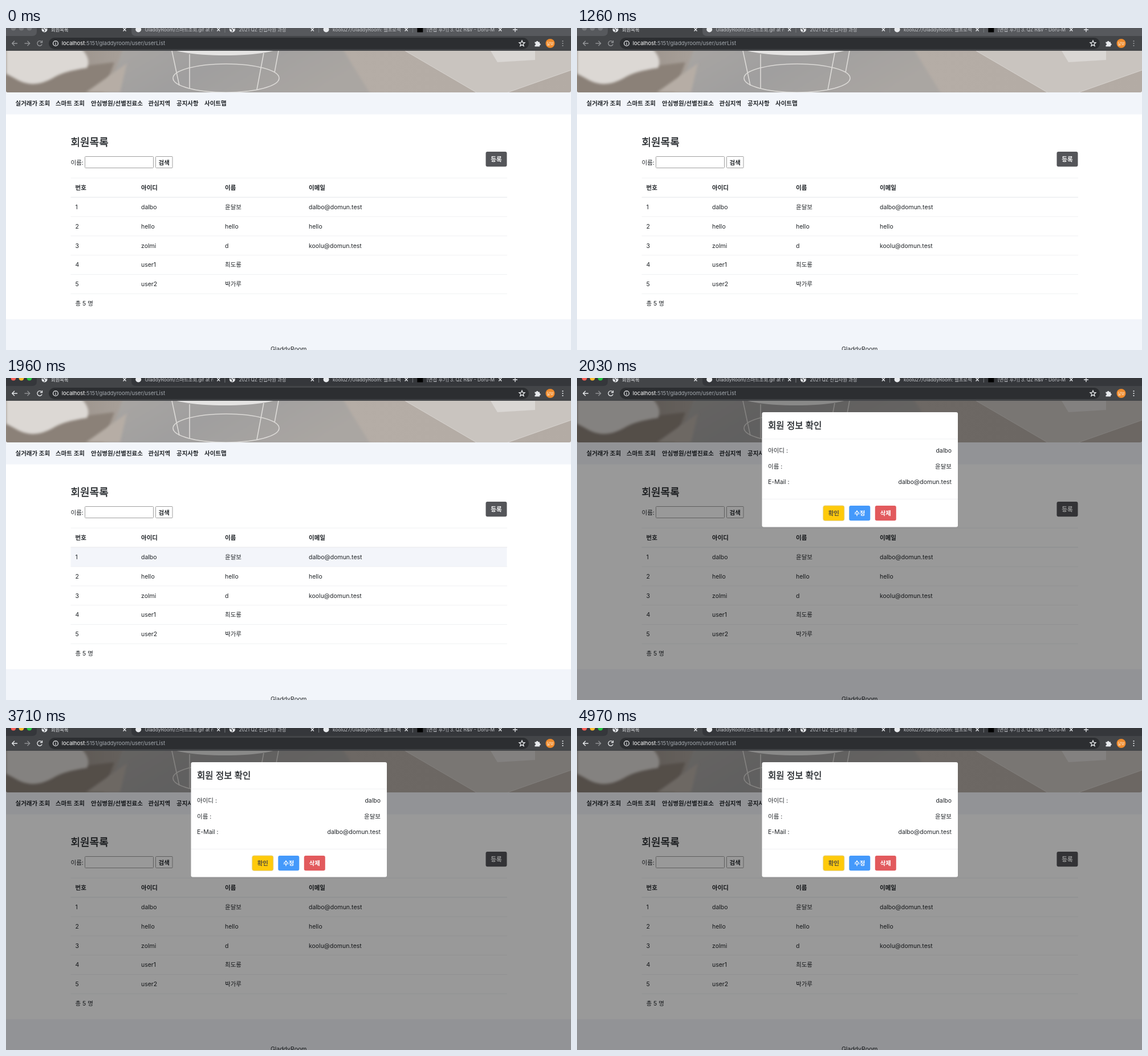
An HTML page that plays this animation: 991 by 565 pixels, repeating every 5.04 s.

```html
<!DOCTYPE html>
<html lang="ko">
<head>
<meta charset="utf-8">
<style>
  html, body { margin: 0; width: 100%; height: 100%; overflow: hidden; background: #fff; }
  svg { display: block; font: 10.5px Inter, "Noto Sans CJK KR", "Noto Sans CJK", sans-serif; fill: #212529; }
  text { white-space: pre; }
  .bold { font-weight: 600; }
  .medium { stroke: #212529; stroke-width: .35; }
  .tab { font-size: 8.3px; fill: #c3c5c9; }
  .line { fill: none; stroke: #eceef0; }
  .icon { fill: none; stroke: #e8eaed; stroke-width: 1.3; }
  .strip { fill: #57595d; }
  .active .strip { fill: #35373b; }
  .light { fill: #75777a; }
  .active .light { fill: var(--lit); }
  .wake { opacity: .5; }
  .active .wake { opacity: 1; }
  #hover, #modal { visibility: hidden; }
  .hover #hover, .open #modal { visibility: visible; }
</style>
</head>
<body>
<svg id="stage" width="991" height="565" viewBox="0 0 991 565">
  <defs>
    <linearGradient id="floor">
      <stop offset="0" stop-color="#8e857d"/><stop offset=".2" stop-color="#a79f98"/>
      <stop offset=".6" stop-color="#b5ada6"/><stop offset="1" stop-color="#b3aba4"/>
    </linearGradient>
    <linearGradient id="rug" x2="1" y2=".3">
      <stop offset="0" stop-color="#a9a6a3"/><stop offset=".45" stop-color="#a09f9f"/>
      <stop offset="1" stop-color="#aaa6a2"/>
    </linearGradient>
    <filter id="soft"><feGaussianBlur stdDeviation="2"/></filter>
    <clipPath id="banner"><path d="M0 40H991V110q0 3-3 3H3q-3 0-3-3z"/></clipPath>
  </defs>
  <g id="page"></g>
  <g id="modal"></g>
  <g id="browser"></g>
</svg>
<script>
const $ = id => document.getElementById(id);
const text = (x, y, s, attrs = '') => `<text x="${x}" y="${y}" ${attrs}>${s.replace(/&/g, '&amp;')}</text>`;
const rect = (x, y, w, h, fill, attrs = '') => `<rect x="${x}" y="${y}" width="${w}" height="${h}" fill="${fill}" ${attrs}/>`;
const circle = (x, y, r, attrs) => `<circle cx="${x}" cy="${y}" r="${r}" ${attrs}/>`;
const path = (d, attrs) => `<path d="${d}" ${attrs}/>`;
const button = (x, y, label, fill, color = '#fff', attrs = '') =>
  rect(x, y, 37, 26.3, fill, `rx="3" ${attrs}`) +
  text(x + 18.5, y + 17, label, `class="bold" text-anchor="middle" style="fill:${color}"`);

const photo = `<g clip-path="url(#banner)">
  ${rect(0, 40, 991, 73, 'url(#floor)')}
  ${path('M0 84L190 60 170 113H0z', 'fill="#8b8178" filter="url(#soft)"')}
  ${path('M205 36H590L640 117H178z', 'fill="url(#rug)" filter="url(#soft)"')}
  ${path('M0 36H132Q150 54 142 70 100 76 82 88 50 106 22 92L0 80z', 'fill="#dcd8d4" filter="url(#soft)"')}
  ${path('M140 113L212 62 200 113z', 'fill="#b6ada5" filter="url(#soft)"')}
  ${path('M700 40H991V74L880 113H825z', 'fill="#c9c4bf"')}
  ${path('M850 40H928V56L862 60z', 'fill="#dad7d4"')}
  ${path('M700 40L825 113M880 113L991 74', 'fill="none" stroke="#d6d2ce"')}
  <g fill="none" stroke="#dcdad7" stroke-width="1.6">
    <ellipse cx="386" cy="88" rx="93" ry="25"/>
    ${path('M291 40L304 101M322 46V106M452 44L440 108M478 40L471 78', '')}
  </g>
  <ellipse cx="384" cy="30" rx="102" ry="18" fill="#e4e3e2"/>
</g>`;

const menu = [[16.5, '실거래가 조회'], [87, '스마트 조회'], [149, '안심병원/선별진료소'],
  [249.5, '관심지역'], [299, '공지사항'], [348, '사이트맵']];
const columns = [121.5, 237, 384, 531];
const members = [
  ['1', 'dalbo', '윤달보', 'dalbo@domun.test'],
  ['2', 'hello', 'hello', 'hello'],
  ['3', 'zolmi', 'd', 'koolu@domun.test'],
  ['4', 'user1', '최도롱', ''],
  ['5', 'user2', '박가루', '']];
const tableRow = (cells, y, attrs) => cells.map((s, i) => text(columns[i], y, s, attrs)).join('');

$('page').innerHTML = rect(0, 0, 991, 565, '#fff') + photo +
  rect(0, 113, 991, 38.5, '#f2f5fa') +
  menu.map(([x, s]) => text(x, 136, s, 'class="bold"')).join('') +
  text(113.5, 206.5, '회원목록', 'class="medium" font-size="18"') +
  text(113.5, 239.5, '이름:') +
  rect(138.5, 225.5, 120, 20, '#fff', 'stroke="#a0a0a0" rx="1"') +
  rect(262.5, 225.5, 29.5, 20, '#fff', 'stroke="#a0a0a0" rx="1"') +
  text(277.2, 239.5, '검색', 'class="bold" text-anchor="middle"') +
  button(841.5, 217, '등록', '#545559') +
  rect(113.5, 297, 765, 34, '#f3f5fa', 'id="hover"') +
  tableRow(['번호', '아이디', '이름', '이메일'], 284, 'class="bold"') +
  members.map((cells, i) => tableRow(cells, 318.2 + i * 33.75)).join('') +
  [0, 1, 2, 3, 4, 5, 6].map(i => path(`M113.5 ${263.2 + i * 33.85}H879`,
    `class="line" stroke-width="${i == 1 ? 1.4 : .8}"`)).join('') +
  text(121.5, 487, '총 5 명') +
  rect(0, 511, 991, 54, '#f2f5fa') +
  text(495.7, 567, 'GladdyRoom', 'text-anchor="middle"');

const details = [['아이디 :', members[0][1]], ['이름 :', members[0][2]], ['E-Mail :', members[0][3]]];
$('modal').innerHTML = rect(0, 40, 991, 525, '#000', 'opacity=".4"') +
  rect(324.5, 60, 343.5, 201.5, '#fff', 'rx="3"') +
  text(335, 89, '회원 정보 확인', 'class="medium" font-size="15.5"') +
  path('M325 107H668M325 212.5H668', 'class="line" stroke-width=".8"') +
  details.map(([label, value], i) => text(335, 131 + i * 27.6, label) +
    text(657, 131 + i * 27.6, value, 'text-anchor="end"')).join('') +
  button(431.8, 224, '확인', '#ffca0c', '#57503a', 'stroke="#e3cf83"') +
  button(477.3, 224, '수정', '#4499fb') +
  button(522.8, 224, '삭제', '#e25a5d');

const globe = x => circle(x, 2.5, 5, 'fill="#e8eaed"') +
  path(`M${x - 4} 1q3 0 4 2t-1 3M${x + 1} -1q0 2 3 2`, 'fill="none" stroke="#505256" stroke-width="1.5"');
const dot = x => circle(x, 2.5, 5, 'fill="#e8eaed"');
const square = x => rect(x - 5, -2.5, 10, 10, '#000');
const tabs = [[globe, '회원목록'], [dot, 'GladdyRoom/스마트조회.gif at m'], [globe, '2021 QZ 신입사원 과정'],
  [dot, 'koolu27/GladdyRoom: 웹프로젝'], [square, '[면접 후기] 3. QZ R&V - Doru-M']];
const tab = ([icon, title], i) => {
  const x = 67.5 + i * 164.7;
  return `<svg x="${x + 11}" width="120" height="14">${text(0.5, 5.7, title, `class="tab" ${i ? '' : 'style="fill:#e8eaed"'}`)}</svg>` +
    icon(x) + path(`M${x + 138} 0l5 5.5m0-5.5l-5 5.5`, 'class="icon" stroke-width="1"') +
    (i > 1 ? path(`M${x - 13} 0V8`, 'stroke="#7a7d81"') : '');
};
const star = Array.from({ length: 10 }, (_, i) => {
  const a = i * Math.PI / 5, r = i % 2 ? 2.3 : 5.2;
  return `${905 + r * Math.sin(a)},${27.3 - r * Math.cos(a)}`;
}).join(' ');

$('browser').innerHTML = rect(0, 0, 991, 14, '', 'class="strip"') +
  path('M46 14q8 0 8-8V0H220V6q0 8 8 8z', 'fill="#434548"') +
  rect(0, 14, 991, 26, '#434548') +
  ['#ff5f57', '#febc2e', '#28c840'].map((c, i) =>
    circle(13 + i * 14, 0, 4.5, `class="light" style="--lit:${c}"`)).join('') +
  tabs.map(tab).join('') +
  path('M889 3H897M893 -1V7', 'class="icon"') +
  `<g class="wake">${path('M20 27H11M15 22.7L10.7 27 15 31.3', 'class="icon"')}
    ${path('M62.5 24.2A4.3 4.3 0 1 0 63.2 28.5M63.5 22V25.5H60', 'class="icon"')}
    ${[23, 27, 31].map(y => circle(976.5, y, 1.1, 'fill="#e8eaed"')).join('')}</g>` +
  path('M32.5 27H41.5M37.5 22.7L41.8 27 37.5 31.3', 'class="icon" opacity=".45"') +
  rect(75, 17, 842, 20, '#2c2e31', 'rx="10"') +
  circle(87, 27, 4.4, 'class="icon" stroke-width="1"') +
  path('M87 26.5V29.5M87 24.3V25.3', 'class="icon"') +
  text(97.7, 30.4, 'localhost<tspan fill="#a5aab0">:5151/gladdyroom/user/userList</tspan>',
    'font-size="9.5" style="fill:#fff"') +
  `<polygon points="${star}" class="icon" stroke-width="1"/>` +
  path('M927.5 24.5h2.5a1.7 1.7 0 0 1 3.4 0h2.6v2.6a1.7 1.7 0 0 1 0 3.4v2h-8.5v-2.4a1.6 1.6 0 0 0 0-3.2z', 'fill="#e8eaed"') +
  circle(954.5, 27, 8, 'fill="#ef8b2c"') +
  text(954.5, 29.5, '달보', 'font-size="6.5" text-anchor="middle" style="fill:#fff"');

const LOOP = 5040, FOCUS = 1610, OPEN = 2030;
function frame() {
  const t = performance.now() % LOOP;
  const { classList } = $('stage');
  classList.toggle('active', t >= FOCUS);
  classList.toggle('hover', t >= FOCUS && t < OPEN);
  classList.toggle('open', t >= OPEN);
  requestAnimationFrame(frame);
}
frame();
</script>
</body>
</html>
```
